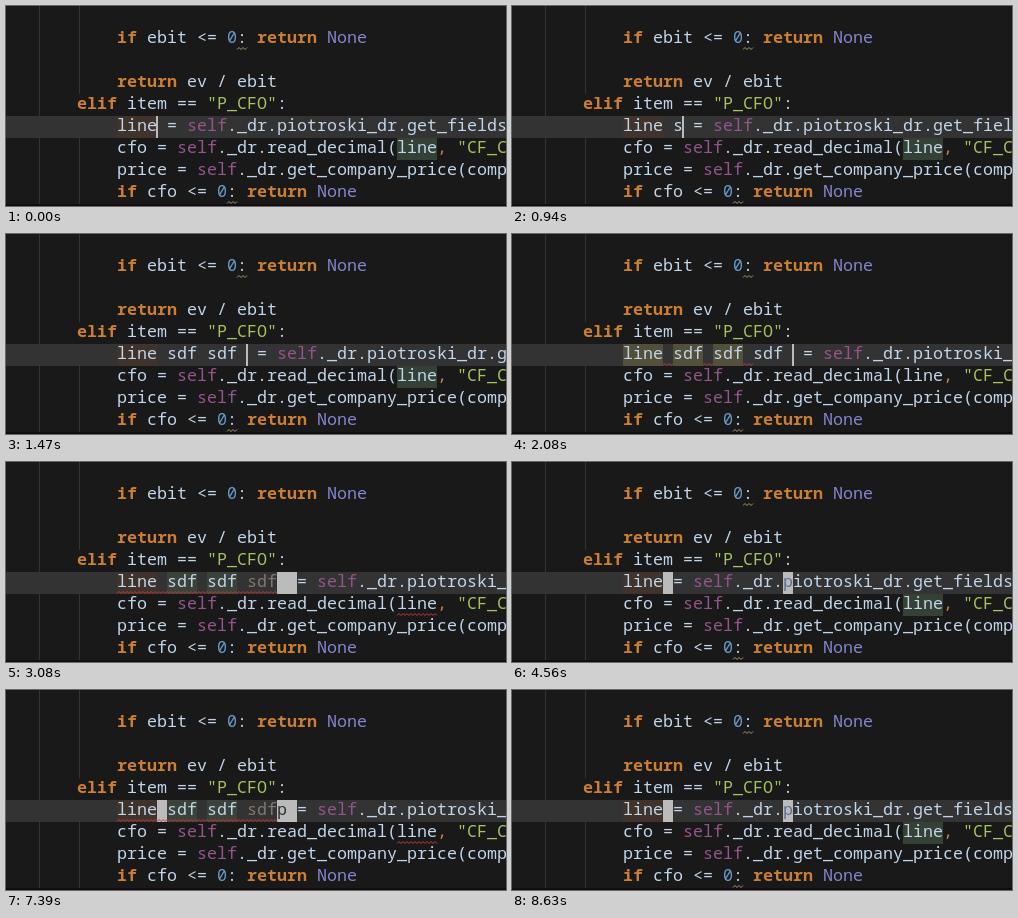
Recreate the animation shown at these times as an HTML page. Size 500 px wide and 200 px high, loop 9010 ms.

```html
<!DOCTYPE html>
<html lang="en">
<head>
<meta charset="utf-8">
<title>Editor undo and redo</title>
<style>
  html, body { margin: 0; width: 100%; height: 100%; overflow: hidden; background: #191919; }
  svg { display: block; width: 500px; height: 200px; }
  text { font: 16.667px "Noto Sans Mono", "DejaVu Sans Mono", monospace; white-space: pre; }
  .bold { font-weight: 700; }
</style>
</head>
<body>
<svg viewBox="0 0 500 200">
  <rect width="500" height="200" fill="#191919"/>
  <rect y="110" width="500" height="22" fill="#333"/>
  <path d="M33.5 0V198M73.5 0V88M73.5 110V198" stroke="#333" fill="none"/>
  <rect y="198" width="500" height="2" fill="#120c10"/>
  <g id="back"></g>
  <g id="code"></g>
  <g id="line"></g>
  <g id="front"></g>
</svg>
<script>
const LOOP = 9010, CELL = 10, LEFT = 111, ROW = 110;
const PLAIN = '#c0d5ea', DIM = '#83776f', RED = '#c53b3b', HINT = '#a8986a', CURSOR = '#bbb';
const TOKEN = /"[^"]*"?|\w+|,|[^\s\w",]+/g;
const COLORS = {
  if: '#cc7f32', elif: '#cc7f32', return: '#cc7f32', ',': '#cc7f32',
  self: '#94558d', None: '#8585cf', 0: '#6a9cc8'
};
const layer = id => document.getElementById(id);
const x = col => LEFT + col * CELL;

function add(parent, tag, attrs, content = '') {
  const el = document.createElementNS('http://www.w3.org/2000/svg', tag);
  for (const key in attrs) el.setAttribute(key, attrs[key]);
  el.textContent = content;
  parent.append(el);
}

// Each token sits on the column grid.
function write(parent, col, top, code, fill) {
  for (const { 0: word, index } of code.matchAll(TOKEN)) {
    const color = fill || (word[0] === '"' ? '#a5c261' : COLORS[word] || PLAIN);
    const bold = /^(if|elif|return)$/.test(word) ? 'bold' : '';
    add(parent, 'text', { x: x(col + index), y: top + 15, fill: color, class: bold }, word);
  }
}

function box(parent, col, top, cells, fill) {
  add(parent, 'rect', { x: x(col), y: top, width: cells * CELL, height: 22, fill });
}

function wave(parent, col, top, cells, stroke) {
  const zigzag = Array.from({ length: cells * CELL / 2 }, (_, i) => i % 2 ? 'l2 2' : 'l2 -2');
  add(parent, 'path', { d: `M${x(col)} ${top + 21.5}${zigzag.join('')}`, stroke, fill: 'none' });
}

write(layer('code'), 0, 22, 'if ebit <= 0: return None');
write(layer('code'), 0, 66, 'return ev / ebit');
write(layer('code'), -4, 88, 'elif item == "P_CFO":');
write(layer('code'), 0, 132, 'cfo = self._dr.read_decimal(line, "CF_C');
write(layer('code'), 0, 154, 'price = self._dr.get_company_price(comp');
write(layer('code'), 0, 176, 'if cfo <= 0: return None');

const TYPED = ' sdf sdf sdf ';
const steps = [[0, { typed: 0, bar: true, blocks: [], ghost: '', hints: true, ref: 'same', marks: '' }]];
const at = (time, change) => steps.push([time, { ...steps[steps.length - 1][1], ...change }]);

[[860, 1], [935, 2], [1010, 3], [1085, 4], [1160, 5], [1310, 6], [1390, 7], [1470, 9],
 [1700, 11], [1770, 13]].forEach(([time, typed]) => at(time, { typed }));
at(2080, { marks: 'warn', ref: '' });
at(2160, { marks: 'error' });
at(2240, { ref: 'error' });
at(2390, { bar: false, blocks: [16] });
at(2470, { hints: false });
at(3080, { blocks: [16, 17] });
at(3800, { typed: 0, marks: 'tail', blocks: [4, 16], ghost: '#5f6c8c' });
at(4100, { ref: '' });
at(4180, { ref: 'same', marks: '' });
at(4560, { hints: true });
at(6750, { typed: 13, blocks: [4, 16, 17], ghost: '#303030' });
at(7070, { marks: 'warn', ref: '' });
at(7140, { marks: 'error', ref: 'error' });
at(7390, { hints: false });
at(7850, { typed: 0, marks: 'tail', blocks: [4, 16], ghost: '#5f6c8c' });
at(8150, { ref: '' });
at(8320, { ref: 'same', marks: '' });
at(8630, { hints: true });

function render({ typed, bar, blocks, ghost, hints, ref, marks }) {
  const back = layer('back'), line = layer('line'), front = layer('front');
  [back, line, front].forEach(g => g.replaceChildren());

  box(back, 0, ROW, 4, '#40332b');
  if (ref === 'same') box(back, 28, 132, 4, '#344134');
  if (ref === 'error') wave(front, 28, 132, 4, RED);
  if (hints) {
    wave(front, 12, 22, 1, HINT);
    wave(front, 11, 176, 1, HINT);
  }
  if (marks === 'warn') {
    [[0, 4], [5, 3], [9, 3]].forEach(([col, n]) => box(back, col, ROW, n, '#52503a'));
    [4, 8, 12].forEach(col => wave(front, col, ROW, 1, RED));
  }
  if (marks === 'error') {
    [5, 9].forEach(col => box(back, col, ROW, 3, '#3a423a'));
    wave(front, 0, ROW, 16, RED);
  }
  if (marks === 'tail') wave(front, 0, ROW, 4, RED);
  blocks.forEach(col => box(back, col, ROW, 1, CURSOR));

  const code = 'line' + TYPED.slice(0, typed);
  const last = marks === 'error' ? 13 : code.length;
  write(line, 0, ROW, code.slice(0, last));
  write(line, last, ROW, code.slice(last), DIM);
  write(line, code.length, ROW, ' = self._dr.piotroski_dr.get_fields');
  if (ghost) write(front, 16, ROW, 'p', ghost);
  if (bar) add(front, 'rect', { x: x(4 + typed) - 1, y: ROW, width: 2, height: 22, fill: CURSOR });
}

const start = performance.now();
let shown;
function tick() {
  const time = (performance.now() - start) % LOOP;
  const state = steps.findLast(([from]) => from <= time)[1];
  if (state !== shown) render(shown = state);
  requestAnimationFrame(tick);
}
tick();
</script>
</body>
</html>
```
